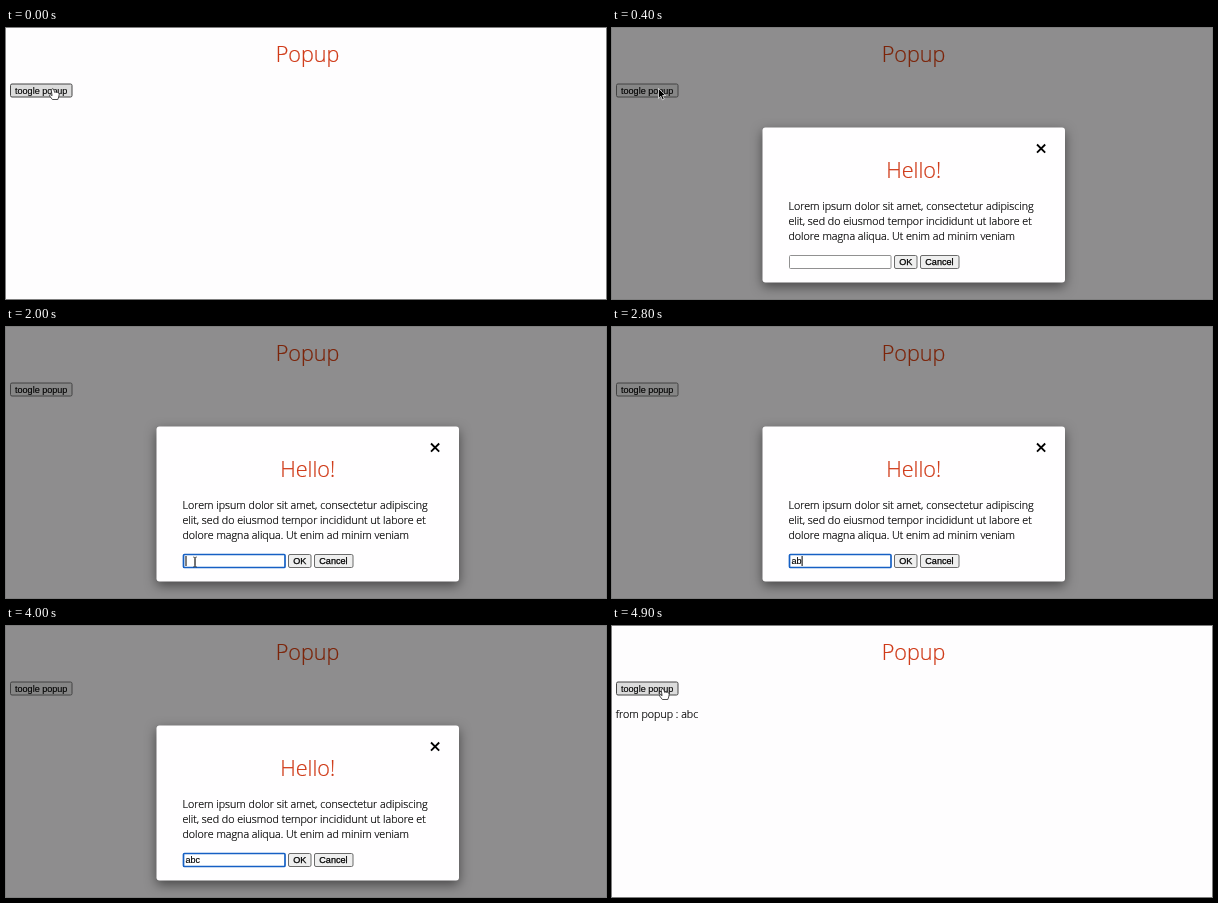
An HTML page for the animation above (5 s loop, 600 px wide and 271 px high).

```html
<!DOCTYPE html>
<html lang="en">
<head>
<meta charset="utf-8">
<title>Popup</title>
<style>
  html, body { margin: 0; width: 100%; height: 100%; overflow: hidden; background: #fefdfe; }
  svg { display: block; width: 100%; height: 100%; }
  text { font: 300 10.7px "Open Sans", sans-serif; white-space: pre; stroke: #000; stroke-width: .22; }
  .title { font-size: 21.6px; fill: #cf3a18; stroke: #cf3a18; text-anchor: middle; }
  .ui { font: 9.07px "Liberation Sans", Arial, sans-serif; stroke-width: .12; }
  .bold { stroke-width: .25; }
  .button { fill: #efefef; stroke: #6b6b6b; }
  .hover .button { fill: #dcdcdc; stroke: #444; }
  .dim .title { fill: #7d2409; stroke: #7d2409; }
  .dim .button { fill: #868686; stroke: #424242; }
  #field { fill: #fff; stroke: #858585; stroke-width: .9; }
  #field.focus { stroke: #1660c4; stroke-width: 1.7; }
  #popup rect:first-child { filter: drop-shadow(0 4px 6px rgba(0, 0, 0, .5)); }
</style>
</head>
<body>
<svg viewBox="0 0 600 271">
  <rect id="shade" width="600" height="271" fill="#8e8d8e"/>
  <g id="page">
    <text class="title" x="301.5" y="33.5">Popup</text>
    <rect class="button" x="4.5" y="56" width="61.5" height="13" rx="1.5"/>
    <text class="ui" x="9" y="65.6">toogle popup</text>
  </g>
  <text id="result" x="3.8" y="92">from popup : abc</text>

  <g id="popup">
    <rect x="150.5" y="99.5" width="302.5" height="155" rx="3" fill="#fffeff"/>
    <path d="M425 116.5l8.2 8.2m0-8.2l-8.2 8.2" stroke="#000" stroke-width="1.8"/>
    <text class="title" x="301.7" y="150">Hello!</text>
    <text x="176.5" y="182">Lorem ipsum dolor sit amet, consectetur adipiscing</text>
    <text x="176.5" y="197">elit, sed do eiusmod tempor incididunt ut labore et</text>
    <text x="176.5" y="212">dolore magna aliqua. Ut enim ad minim veniam</text>
    <rect id="field" x="177.5" y="227.5" width="101.5" height="13" rx="1"/>
    <text id="typed" class="ui" x="179.5" y="237"></text>
    <rect id="caret" y="229" width="1" height="10"/>
    <rect class="button" x="282.5" y="227.5" width="22.5" height="13" rx="1.5"/>
    <text class="ui bold" x="287.2" y="237.2">OK</text>
    <rect class="button" x="308.5" y="227.5" width="38.5" height="13" rx="1.5"/>
    <text class="ui bold" x="313.3" y="237.2">Cancel</text>
  </g>

  <g id="cursor">
    <path id="arrow" d="M0 0V9.8L2.3 7.7L3.9 11.3L5.7 10.5L4.1 7H7.1Z" fill="#000" stroke="#fff" stroke-width=".7"/>
    <path id="hand" d="M-.8 .8Q.3-.5 1.2 .9L2.2 4Q3.2 3 4 4Q5 3.3 5.6 4.4Q6.7 4.1 6.8 5.4L6.2 8.5L5.3 11H-.1L-3 7.3Q-3.2 5.8-1.7 6.3L-.4 7.2L-1.2 2Z" fill="#fff" stroke="#222" stroke-width=".8"/>
    <path id="beam" d="M-1.8-5Q0-5 0-3.5V3.5Q0 5-1.8 5M1.8-5Q0-5 0-3.5V3.5Q0 5 1.8 5" fill="none" stroke="#222" stroke-width=".8"/>
  </g>
</svg>
<script>
const $ = id => document.getElementById(id);
const show = (id, on) => $(id).style.display = on ? "" : "none";
const LOOP = 5000, STEP = 100;
const OPEN = 400, FOCUS = 2000, CLOSE = 4100, RETURN = 4300;
const keys = [2600, 2800, 3300];

// time, x, y of the pointer tip
const path = [
  [0, 46.5, 60.5], [OPEN, 46.5, 60.5], [700, 182, 212], [1200, 192, 226], [1400, 189, 235],
  [4200, 189, 235], [4700, 55, 64], [4900, 50.5, 62.5]
];

function pointer(t) {
  const i = path.findIndex(p => p[0] > t);
  if (i < 0) return path[path.length - 1].slice(1);
  const [a, b] = [path[i - 1], path[i]];
  const u = (t - a[0]) / (b[0] - a[0]), e = u * u * (3 - 2 * u);
  return [1, 2].map(k => a[k] + (b[k] - a[k]) * e);
}

function draw(now) {
  const t = Math.floor(now % LOOP / STEP) * STEP;
  const open = t >= OPEN && t < CLOSE, focus = open && t >= FOCUS;
  const hover = t < OPEN || t >= 4700;
  show("shade", open);
  show("popup", open);
  show("result", t >= CLOSE);
  $("page").setAttribute("class", open ? "dim" : hover ? "hover" : "");
  $("field").setAttribute("class", focus ? "focus" : "");

  const pressed = keys.filter(k => k <= t);
  $("typed").textContent = "abc".slice(0, pressed.length);
  const lastInput = pressed.length ? pressed[pressed.length - 1] : FOCUS;
  show("caret", focus && (t - lastInput) % 1000 < 500);
  if (open) $("caret").setAttribute("x", 179.5 + $("typed").getComputedTextLength());

  const beam = t >= 1300 && open;
  show("cursor", t < keys[0] || t >= RETURN);
  show("hand", hover);
  show("beam", beam);
  show("arrow", !hover && !beam);
  $("cursor").setAttribute("transform", `translate(${pointer(t)})`);
}

function tick() {
  draw(performance.now());
  requestAnimationFrame(tick);
}
tick();
</script>
</body>
</html>
```
